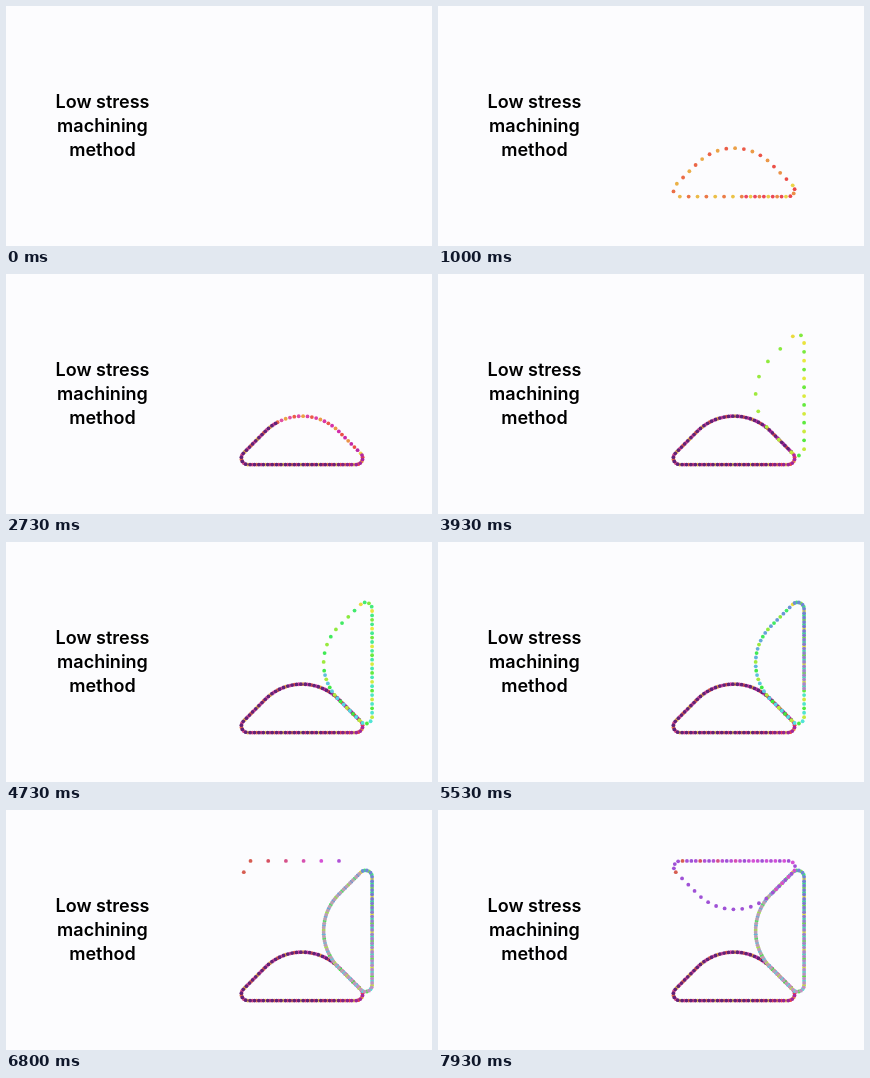
An HTML page with a canvas that plays this animation: 426 px wide and 240 px high, repeating every 8 s.

```html
<!DOCTYPE html>
<html lang="en">
<head>
<meta charset="utf-8">
<title>Low stress machining method</title>
<style>
  html, body { margin: 0; width: 100%; height: 100%; overflow: hidden; background: #fcfcfe; }
  canvas { position: absolute; left: 0; top: 0; }
  p {
    position: absolute; left: 16px; top: 84px; width: 161px; margin: 0;
    font: 600 18px/24px Inter, sans-serif; text-align: center; color: #000;
  }
</style>
</head>
<body>
<canvas width="426" height="240"></canvas>
<p>Low stress<br>machining<br>method</p>
<script>
const ctx = document.querySelector('canvas').getContext('2d');
const LOOP = 8000, FRAMES = 120;
const DOTS = 128, DOT_RADIUS = 1.9;
const DOTS_PER_FRAME = 4 * DOTS / 199;

// Rounded dome, clockwise from its lower right corner.
const outline = document.createElementNS('http://www.w3.org/2000/svg', 'path');
outline.setAttribute('d', `M354.7 179.3 A6.6 6.6 0 0 1 350 190.6 H242
  A6.6 6.6 0 0 1 237.3 179.3 L259.2 157.4 A52 52 0 0 1 332.8 157.4 Z`);
const perimeter = outline.getTotalLength();

// The first pass is coarse; each later pass halves the gaps.
const order = [];
const addPass = (start, step) => {
  for (let slot = start; slot < DOTS; slot += step) order.push(slot);
};
addPass(0, 8);
for (let gap = 8; gap > 1; gap /= 2) addPass(gap / 2, gap);

const quarterTurn = ({ x, y }) => ({ x: y + 175.5, y: 417 - x });
const ramp = (u, from, to) => Math.min(1, Math.max(0, (u - from) / (to - from)));
const hsl = (h, s, l) => `hsl(${h} ${s}% ${l}%)`;

// Colour of each dome's dots by their share u of its drawing order.
const palettes = [
  u => hsl(52 - 125 * ramp(u, 0, .6), 80 - 25 * ramp(u, .3, .6), 60 - 30 * ramp(u, .42, .56)),
  u => hsl(55 + 265 * ramp(u, 0, .8), 80 - 62 * ramp(u, .3, .8), 58 + 10 * ramp(u, .2, .8)),
  u => hsl(5 - 90 * ramp(u, .01, .05) + 60 * ramp(u, .25, .5), 62, 58)
];

const dots = [];
let points = order.map(slot => outline.getPointAtLength(slot / DOTS * perimeter));
for (const palette of palettes) {
  points.forEach(({ x, y }, i) => dots.push({ x, y, color: palette(i / DOTS) }));
  points = points.map(quarterTurn);
}

function draw(time) {
  const frame = Math.floor((time % LOOP + 5) * FRAMES / LOOP) % FRAMES;
  ctx.clearRect(0, 0, 426, 240);
  for (const { x, y, color } of dots.slice(0, Math.ceil(frame * DOTS_PER_FRAME))) {
    ctx.fillStyle = color;
    ctx.beginPath();
    ctx.arc(x, y, DOT_RADIUS, 0, 2 * Math.PI);
    ctx.fill();
  }
}

let begin;
requestAnimationFrame(function tick(now) {
  begin ??= now;
  draw(now - begin);
  requestAnimationFrame(tick);
});
</script>
</body>
</html>
```
